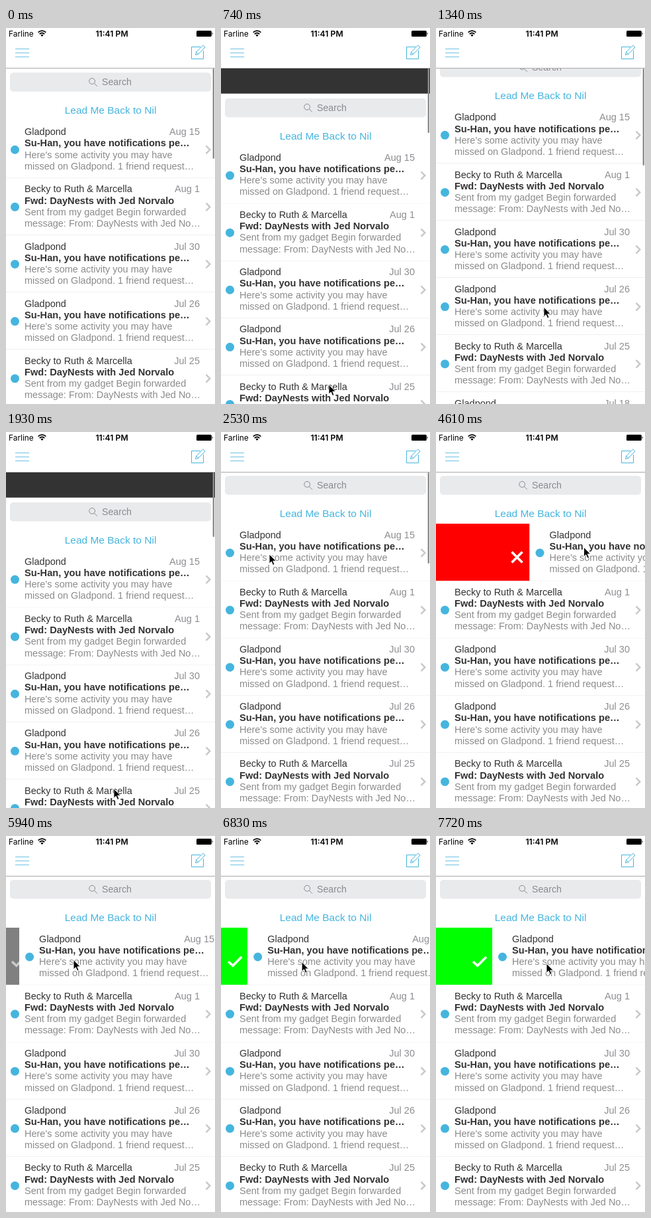
Recreate the animation shown at these times as an HTML page. Size 316 px wide and 566 px high, loop 8 s.

```html
<!DOCTYPE html>
<html lang="en">
<head>
<meta charset="utf-8">
<title>Mail list gestures</title>
<style>
  html, body { margin: 0; width: 100%; height: 100%; overflow: hidden; background: #fff; }
  svg { display: block; width: 316px; height: 566px; }
  text { font: 14.5px "Liberation Sans", Arial, sans-serif; }
  .status { font: 11.9px Inter, Roboto, sans-serif; }
  .clock { font-size: 12.2px; font-weight: 600; text-anchor: middle; }
  .from { fill: #333; }
  .subject { font-weight: bold; font-size: 14.65px; fill: #333; }
  .snippet { fill: #8b8b8b; }
  .date { fill: #8e8e93; text-anchor: end; }
  .hint { font-size: 15.5px; fill: #45b5de; text-anchor: middle; }
  .search { font-size: 14.2px; fill: #8a8a8f; }
  .line { fill: none; stroke-width: 1; }
</style>
</head>
<body>
<svg viewBox="0 0 316 566">
  <rect y="61" width="316" height="505" fill="#333"/>
  <g id="list">
    <rect y="58.7" width="316" height="640" fill="#fff"/>
    <rect x="6" y="66" width="304" height="28.5" rx="5" fill="#e9eaec"/>
    <g class="line" stroke="#8a8a8f">
      <circle cx="130.2" cy="78.8" r="4.4"/>
      <path d="M133.5 82.1L138 86.6"/>
    </g>
    <text class="search" x="145" y="84.7">Search</text>
    <text class="hint" x="158" y="127.5">Lead Me Back to Nil</text>
    <rect id="action" y="138" height="86"/>
    <g id="icon" fill="none" stroke="#fff" stroke-width="3.6">
      <path id="check" d="M-10 .5L-3.2 6.8L10 -6.5"/>
      <path id="cross" d="M-8 -8L8 8M8 -8L-8 8"/>
    </g>
    <g id="rows"></g>
  </g>
  <rect id="bar" x="312.6" y="61" width="2.4" rx="1.2" fill="#8c8c8c"/>

  <rect width="316" height="60.5" fill="#fff"/>
  <path class="line" d="M0 60.5H316" stroke="#a9a9a9"/>
  <text class="status" x="4" y="12.8">Farline</text>
  <g fill="none" stroke="#000" stroke-width="1.7">
    <path d="M48.6 6.6Q54.5 1.6 60.4 6.6"/>
    <path d="M50.7 9.1Q54.5 5.9 58.3 9.1"/>
  </g>
  <path d="M52.4 10.6Q54.5 9.1 56.6 10.6L54.5 13Z"/>
  <text class="status clock" x="160" y="12.8">11:41 PM</text>
  <rect x="288" y="4" width="22.8" height="9" rx="1.6"/>
  <path d="M311.6 6.8Q313.8 8.5 311.6 10.2Z"/>
  <path class="line" d="M14 31.5H35M14 37.5H35M14 43.5H35" stroke="#6cc3e4"/>
  <g class="line" stroke="#45b5de">
    <path d="M294 28.5H280.5V46.5H298.5V34"/>
    <path d="M286.5 40.5L287.7 36.1L297.8 25.9L301 29.1L290.8 39.3ZM287.7 36.1L290.8 39.3"/>
  </g>
  <path id="cursor" d="M0 0V14.2L3.3 11.1L5.6 16.4L8 15.4L5.7 10.2H10.2Z" fill="#000" stroke="#fff" stroke-width=".9"/>
</svg>
<script>
const $ = id => document.getElementById(id);
const STEP = 148.4, LOOP = 8000, LAST = 52;
const RELEASE = 13, SETTLED = 17, PITCH = 86.1;
const GRAB_X = 80, GRAB_Y = 441, DAMPING = 0.417;

const social = ["Gladpond", "Su-Han, you have notifications pe…",
  "Here's some activity you may have", "missed on Gladpond. 1 friend request…"];
const forward = ["Becky to Ruth &amp; Marcella", "Fwd: DayNests with Jed Norvalo",
  "Sent from my gadget Begin forwarded", "message: From: DayNests with Jed No…"];
const styles = ["from", "subject", "snippet", "snippet"];
const dates = ["Aug 15", "Aug 1", "Jul 30", "Jul 26", "Jul 25", "Jul 18"];

$("rows").innerHTML = dates.map((date, i) => `
  <g transform="translate(0 ${138 + i * PITCH})">
    <g class="cell">
      <rect x="-2" width="330" height="86" fill="#fff"/>
      <circle cx="13.5" cy="44" r="6.5" fill="#45b5de"/>
      ${(i % 3 === 1 ? forward : social).map((s, k) =>
        `<text class="${styles[k]}" x="28" y="${22.1 + k * 17.1}">${s}</text>`).join("")}
      <text class="date" x="293" y="22.1">${date}</text>
      <path d="M302.5 38.2L308.3 44L302.5 49.8" fill="none" stroke="#c7c7cc" stroke-width="2.4"/>
    </g>
    <path class="line" d="M0 86.4H316" stroke="#d4d4d6"/>
  </g>`).join("");
const cell = document.querySelector(".cell");

// Turning points of the pointer: step, x, y
const path = [[0, 163, 444], [4, 163, 537], [7, 163, 408], [8, 163, 408], [RELEASE, 163, 537],
  [SETTLED, 73, 184], [18, 80, 185], [19, 80, 185], [33, 231, 173], [36, 231, 173],
  [41, 88.5, 188], [LAST, 167, 192]];

const ease = t => (1 - Math.cos(Math.PI * Math.min(1, Math.max(0, t)))) / 2;

function pointer(n) {
  const j = Math.max(1, path.findIndex(p => p[0] >= n));
  const [a, ax, ay] = path[j - 1], [b, bx, by] = path[j];
  const e = ease((n - a) / (b - a));
  return [ax + (bx - ax) * e, ay + (by - ay) * e];
}

// The list follows the pointer, damped past the top, and springs back on release
function scrollAt(n) {
  const drag = pointer(Math.min(n, RELEASE))[1] - GRAB_Y;
  const back = 1 - ease((n - RELEASE) / (SETTLED - RELEASE));
  return drag * (drag > 0 ? DAMPING : 1) * back;
}

function set(el, attrs) {
  for (const k in attrs) el.setAttribute(k, attrs[k]);
}
const move = (x, y) => `translate(${x} ${y})`;

function draw(n) {
  const [x, y] = pointer(n);
  const scroll = scrollAt(n);
  const swipe = n > SETTLED ? x - GRAB_X : 0;
  const edge = Math.max(0, swipe - 2), far = swipe > 115;

  set($("list"), { transform: move(0, scroll) });
  set($("bar"), { height: 137 - scroll * (scroll > 0 ? 1 : 0.43), opacity: n <= SETTLED ? 1 : 0 });
  set(cell, { transform: move(swipe, 0) });
  set($("action"), { width: edge, fill: far ? "#f00" : swipe > 38 ? "#0f0" : "#808080" });
  set($("icon"), { transform: move(Math.max(19, edge - 19), 188.5), opacity: Math.min(1, swipe / 38) });
  set($("check"), { opacity: far ? 0 : 1 });
  set($("cross"), { opacity: far ? 1 : 0 });
  set($("cursor"), { transform: move(x, y), opacity: n ? 1 : 0 });
}

const start = performance.now();
function tick() {
  const t = (performance.now() - start) % LOOP;
  draw(Math.min(LAST, Math.floor(t / STEP)));
  requestAnimationFrame(tick);
}
tick();
</script>
</body>
</html>
```
